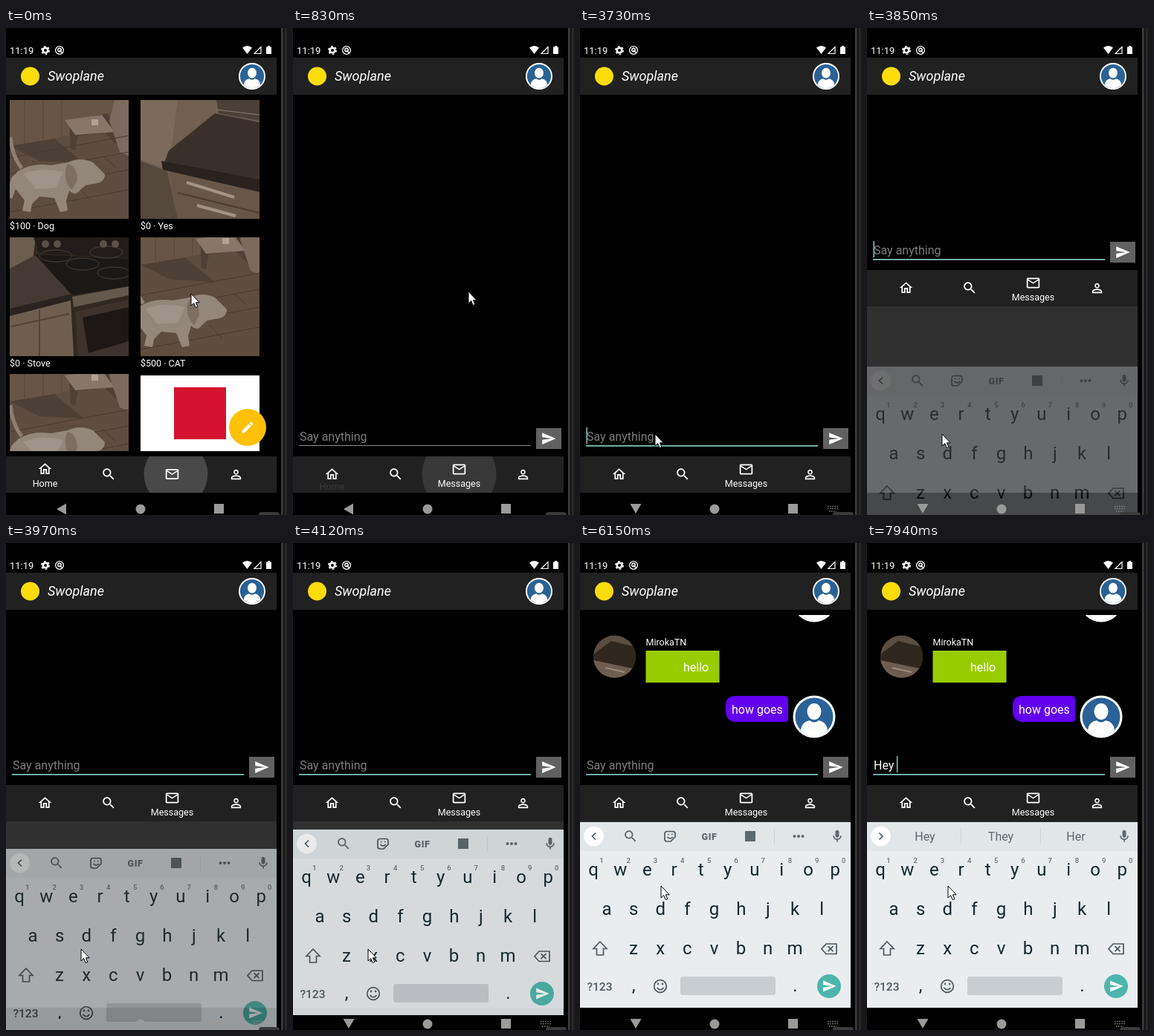
These frames come from a looping animation (378x656 px, 8000 ms). An HTML page:

```html
<!DOCTYPE html>
<html lang="en">
<head>
<meta charset="utf-8">
<title>Chat demo</title>
<style>
html, body { margin: 0; width: 100%; height: 100%; overflow: hidden; background: #000; }
svg { display: block; width: 100%; height: 100%; }
text { font-family: Roboto, sans-serif; font-size: 12.5px; fill: #fff; white-space: pre; }
.mid { text-anchor: middle; }
.body { font-size: 16px; }
.key { font-size: 24px; fill: #14282f; text-anchor: middle; }
.digit { font-size: 9.5px; font-weight: 500; fill: #66737a; text-anchor: middle; }
.hint { font-size: 16px; fill: #5d696f; text-anchor: middle; }
.line { fill: none; stroke: #4c5a60; stroke-width: 1.7; }
</style>
</head>
<body>
<svg id="stage" viewBox="0 0 378 656"></svg>
<script>
const PATHS = {
  home: 'M12 5.69l5 4.5V18h-2v-6H9v6H7v-7.81l5-4.5M12 3L2 12h3v8h6v-6h2v6h6v-8h3L12 3z',
  search: 'M15.5 14h-.79l-.28-.27C15.41 12.59 16 11.11 16 9.5 16 5.91 13.09 3 9.5 3S3 5.91 3 9.5 5.91 16 9.5 16c1.61 0 3.09-.59 4.23-1.57l.27.28v.79l5 4.99L20.49 19l-4.99-5zm-6 0C7.01 14 5 11.99 5 9.5S7.01 5 9.5 5 14 7.01 14 9.5 11.99 14 9.5 14z',
  mail: 'M22 6c0-1.1-.9-2-2-2H4c-1.1 0-2 .9-2 2v12c0 1.1.9 2 2 2h16c1.1 0 2-.9 2-2V6zm-2 0l-8 5-8-5h16zm0 12H4V8l8 5 8-5v10z',
  person: 'M12 5.9c1.16 0 2.1.94 2.1 2.1s-.94 2.1-2.1 2.1S9.9 9.16 9.9 8s.94-2.1 2.1-2.1m0 9c2.97 0 6.1 1.46 6.1 2.1v1.1H5.9V17c0-.64 3.13-2.1 6.1-2.1M12 4C9.79 4 8 5.79 8 8s1.79 4 4 4 4-1.79 4-4-1.79-4-4-4zm0 9c-2.67 0-8 1.34-8 4v3h16v-3c0-2.66-5.33-4-8-4z',
  send: 'M2 21L23 12 2 3v7l15 2-15 2z',
  edit: 'M3 17.25V21h3.75L17.81 9.94l-3.75-3.75L3 17.25zM20.71 7.04c.39-.39.39-1.02 0-1.41l-2.34-2.34c-.39-.39-1.02-.39-1.41 0l-1.83 1.83 3.75 3.75 1.83-1.83z',
  mic: 'M12 14c1.66 0 3-1.34 3-3V5c0-1.66-1.34-3-3-3S9 3.34 9 5v6c0 1.66 1.34 3 3 3zM17 11c0 2.76-2.24 5-5 5s-5-2.24-5-5H5c0 3.53 2.61 6.43 6 6.92V21h2v-3.08c3.39-.49 6-3.39 6-6.92h-2z'
};

// Markup helpers
const rect = (x, y, w, h, fill, more = '') => `<rect x="${x}" y="${y}" width="${w}" height="${h}" fill="${fill}" ${more}/>`;
const circle = (x, y, r, fill, more = '') => `<circle cx="${x}" cy="${y}" r="${r}" fill="${fill}" ${more}/>`;
const path = (d, fill, more = '') => `<path d="${d}" fill="${fill}" ${more}/>`;
const line = (d, more = '') => `<path d="${d}" class="line" ${more}/>`;
const text = (x, y, s, cls = '', more = '') => `<text x="${x}" y="${y}" class="${cls}" ${more}>${s}</text>`;
const group = (id, inner, more = '') => `<g id="${id}" ${more}>${inner}</g>`;
const icon = (name, x, y, size = 20, fill = '#fff', id = '') =>
  `<g id="${id}" transform="translate(${x} ${y})">` +
  path(PATHS[name], fill, `transform="scale(${size / 24}) translate(-12 -12)"`) + '</g>';

const avatar = (x, y, r) => `<g transform="translate(${x} ${y}) scale(${r / 28.5})">` +
  circle(0, 0, 28.5, '#fff') + circle(0, 0, 25.5, '#2a6296') +
  '<ellipse cy="-7" rx="9.5" ry="11" fill="#fff"/>' +
  path('M-18 18Q-17 7-6 5Q0 10 6 5Q17 7 18 18Q10 26 0 26T-18 18z', '#fff') + '</g>';

const photo = (x, y, inner) => `<svg x="${x}" y="${y}" width="160" height="160">${inner}</svg>`;

function dogPhoto(x, y, roomY, dx, dy) {
  const planks = [70, 92, 116, 143].map(v => `M0 ${v + 8}L160 ${v - 22}`).join('');
  return photo(x, y, rect(0, 0, 160, 160, '#5d4d40') +
    `<g transform="translate(0 ${roomY})">` +
    path('M0 0H160V30L60 52 0 62z', '#675647') +
    path('M20 0V58M45 0V54M70 0V50', 'none', 'stroke="#54463a"') +
    path('M0 62L60 52 100 85 40 82z', '#4d4036') +
    path('M80 28L132 18 150 52 146 62 128 44 92 48 88 68 82 66z', '#4c4037') +
    path('M74 27L124 20 141 43 88 47z', '#87776a') +
    path('M141 0H160V75L148 70 134 28z', '#7b6b5e') +
    path('M110 26h9v8h-9z', '#b0a294') + '</g>' +
    path(planks + 'M30 82l14 13M92 118l18 18M125 75l18 16', 'none', 'stroke="#46392f"') +
    `<g transform="translate(${dx} ${dy})">` +
    path('M1 50Q3 75 16 92', 'none', 'stroke="#8d7f71" stroke-width="5"') +
    path('M11 96Q30 84 55 88L78 84Q95 76 112 84L128 100Q128 112 112 113L102 115 94 122Q88 130 80 122L76 136 78 149 68 151 60 132 40 130 30 140 28 151 17 149 20 135 8 120 3 133-4 130 2 105z', '#93867a') +
    path('M78 86Q90 88 91 108L84 121Q73 112 75 93z', '#7c6e62') +
    path('M18 99Q45 90 72 97L62 118 35 120z', '#a0948a') + '</g>');
}

const counter = rect(0, 0, 160, 160, '#6f6051') +
  path('M0 0H50L42 62 28 90 0 80z', '#7a6b5c') +
  path('M102 0H160V28L105 18z', '#4a4038') + path('M102 13L160 20', 'none', 'stroke="#8a7b6b"') +
  path('M38 68L100 18 160 30V118L30 90z', '#3a302b') +
  path('M28 82L160 107V124L30 94z', '#29221f') +
  path('M38 96L160 125V160H50z', '#66574a') + path('M0 82L36 96 50 160H0z', '#55483d') +
  path('M50 125L160 152', 'none', 'stroke="#4a3d33" stroke-width="2"') +
  path('M62 111L126 131M76 142L128 156', 'none', 'stroke="#a09486" stroke-width="4"');

const stove = rect(0, 0, 160, 160, '#30291f') +
  path('M0 0H35L30 38 0 45z', '#6b5d50') + path('M32 0H160V28L40 22z', '#221d1a') +
  path('M35 23L160 29V66L82 78z', '#1c1816') +
  [[62, 25], [98, 36], [130, 20], [140, 48]].map(([x, y]) =>
    `<ellipse cx="${x}" cy="${y}" rx="22" ry="8" fill="none" stroke="#4a423c"/>`).join('') +
  [48, 64, 126, 142].map(x => circle(x, 9, 5, '#5c5148')).join('') +
  path('M0 42L34 24 84 78 0 98z', '#453a33') + path('M0 96L84 76V86L0 108z', '#2a231f') +
  path('M0 106L82 85 86 160H0z', '#6d5e50') +
  path('M2 120L80 103M40 98V160', 'none', 'stroke="#504337" stroke-width="2"') +
  path('M84 80L160 66V78L86 94z', '#65584d') + path('M88 100L160 84V160H92z', '#3d332c') +
  path('M98 108L160 94V140L106 156z', '#1d1815');

const home = group('home',
  dogPhoto(5, 97, 0, 0, 0) + photo(181, 97, counter) + photo(5, 282, stove) +
  dogPhoto(181, 282, -25, -12, -3) + dogPhoto(5, 466, -25, 0, -8) +
  rect(181, 468, 160, 110, '#fff') + rect(226, 484, 70, 70, '#d5122f') +
  text(5, 271, '$100 · Dog') + text(181, 271, '$0 · Yes') +
  text(5, 455.5, '$0 · Stove') + text(181, 455.5, '$500 · CAT') +
  rect(0, 570, 364, 10, '#000') + circle(325, 538, 25, '#ffc107') + icon('edit', 325, 538));

const chat = group('chat',
  `<svg y="97" width="364" height="180" viewBox="0 97 364 180">` +
  avatar(315, 78, 28.5) + avatar(315, 234, 28.5) +
  '<clipPath id="round"><circle cx="46.5" cy="153" r="28.5"/></clipPath><g clip-path="url(#round)">' +
  rect(18, 124, 57, 58, '#5a4d42') + path('M18 150L42 132 75 140V170L18 158z', '#30271f') +
  path('M18 158L75 170V182H18z', '#6d5e50') + path('M34 168L60 174', 'none', 'stroke="#9a8c7e" stroke-width="2"') + '</g>' +
  text(88.5, 138, 'MirokaTN') + rect(88.5, 145, 99, 43, '#99cc00') + text(139, 173, 'hello', 'body') +
  path('M208 206H275Q280 206 280 211V237Q280 241 276 241H208Q196 239 196 226V219Q196 207 208 206z', '#6200ee') +
  text(204, 230, 'how goes', 'body') + '</svg>');

const lower = group('lower',
  group('input',
    text(9, 555.5, 'Say anything', 'body', 'id="prompt" style="fill:#7d7d7d"') +
    text(9, 555.5, '', 'body', 'id="typed"') + rect(9, 558, 0, 1, '#fff', 'id="compose"') +
    rect(8, 562, 312, 1, '#8a8a8a', 'id="rule"') + rect(8.5, 538, 1.5, 22, '#80cbc4', 'id="caret"') +
    rect(327, 539, 34, 28, '#616161') + icon('send', 344, 553, 21)) +
  '<clipPath id="bar"><rect y="577" width="364" height="49"/></clipPath>' +
  rect(0, 577, 364, 49, '#212121') +
  `<g clip-path="url(#bar)">${circle(0, 601, 0, '#fff', 'id="ripple"')}</g>` +
  icon('home', 0, 0, 21, '#fff', 'homeIcon') + text(52.5, 617.5, 'Home', 'mid', 'id="homeLabel"') +
  icon('search', 138, 601, 21) + icon('mail', 0, 0, 21, '#fff', 'mailIcon') +
  text(223.5, 618, 'Messages', 'mid', 'id="mailLabel"') + icon('person', 309.5, 601.5, 20));

const row = (letters, x, y) => [...letters].map((c, i) => text(x + i * 36.15, y, c, 'key')).join('');
const gray = '#5d696f';
const tools = icon('search', 68, 395, 21, gray) +
  line('M117 388.5H125Q128 388.5 128 391.5V396L122 402H117Q114 402 114 399V391.5Q114 388.5 117 388.5zM117.5 396Q121 400 125 396M118 392.5h1.5M123 392.5h1.5') +
  text(174, 399.5, 'GIF', 'hint', 'style="font-size:12.5px;font-weight:900;letter-spacing:.6px"') +
  rect(222, 388, 14, 14, gray) + rect(261, 385, 1, 21, '#cdd2d5') +
  [288.5, 294, 299.5].map(x => circle(x, 395, 2, gray)).join('');
const hints = [78, 180, 281].map((x, i) => text(x, 401, '', 'hint', `id="hint${i}"`)).join('') +
  rect(126, 384, 1, 22, '#cdd2d5') + rect(233, 384, 1, 22, '#cdd2d5');

const keyboard = group('keyboard',
  rect(0, 376, 364, 250, '#e9edf0') + rect(0, 376, 364, 39, '#e1e6e9') +
  circle(18.5, 395, 13.3, '#fff') + line('M21 390.5L16.5 395 21 399.5', 'id="chevron"') +
  group('tools', tools) + group('hints', hints) + icon('mic', 346, 395, 20, gray) +
  row('qwertyuiop', 18, 448) + row('asdfghjkl', 36, 501) + row('zxcvbnm', 72, 554) +
  [...'1234567890'].map((c, i) => text(29 + i * 36.2, 431, c, 'digit')).join('') +
  line('M27 537L36 546.5H31.5V555H22.5V546.5H18z') +
  line('M331 540H345V553.5H331L325 546.7zM333.5 543.2L340.5 550.2M340.5 543.2L333.5 550.2') +
  text(26.5, 602.5, '?123', 'key', 'style="font-size:15.5px;font-weight:500;fill:#4c5a60"') +
  text(72, 604, ',', 'key') + text(289.5, 604, '.', 'key') +
  line('M103.5 599Q108 604.5 112.5 599') + circle(108, 597, 8.3, 'none', 'class="line"') +
  circle(105, 594, 1.4, gray) + circle(111, 594, 1.4, gray) +
  rect(135, 584, 128, 25, '#c8cdd1', 'rx="3"') +
  circle(335, 597, 16, '#4db6ac') + icon('send', 335.5, 597, 20));

const statusBar = text(5, 34.5, '11:19', '', 'style="font-size:13px"') +
  circle(53, 30, 3.3, 'none', 'stroke="#fff" stroke-width="2.6"') +
  circle(53, 30, 5.2, 'none', 'stroke="#fff" stroke-width="1.6" stroke-dasharray="2.7 2.75"') +
  circle(72, 30, 5.4, 'none', 'stroke="#fff" stroke-width="1.3"') +
  circle(72, 29.5, 2.3, 'none', 'stroke="#fff" stroke-width="1.4"') + path('M72 30L76 34', 'none', 'stroke="#fff" stroke-width="1.4"') +
  path('M318 26.5Q324.5 21.5 331 26.5L324.5 35z', '#fff') +
  path('M343 25.5V34.5H334z', 'none', 'stroke="#fff" stroke-width="1.2"') +
  path('M350 25.5h2V24h3v1.5h2V35h-7z', '#fff');

const header = rect(0, 40, 364, 50, '#212121') + circle(32.5, 65, 12.5, '#fddc0c') +
  text(56, 71, 'Swoplane', '', 'style="font-size:18px;font-style:italic"') + avatar(331, 65, 18);

const systemBar = path('', '#9a9a9a', 'id="back"') + circle(181, 648, 6.5, '#9a9a9a') + rect(280, 641, 13, 13, '#9a9a9a') +
  group('imeIcon', path('M333 644.5H347M333 647.5H347M335 651H345', 'none', 'stroke="#858585" stroke-width="1.4" stroke-dasharray="1.5 1.6"'));

const bezel = rect(370, 0, 8, 656, '#1b1b1b') + rect(370.5, 0, 1.5, 656, '#4b4b4b') + rect(376, 0, 1, 656, '#383838') +
  rect(340, 652, 28, 10, '#3a3a3a', 'rx="4"');

document.getElementById('stage').innerHTML = rect(0, 0, 378, 656, '#000') + statusBar + header + home + chat +
  rect(0, 375, 364, 251, '#303030', 'id="backdrop"') + lower + keyboard + systemBar + bezel +
  path('M0 0V16L3.7 12.6 6.2 18.5 8.8 17.4 6.4 11.8H11.2z', '#fff', 'id="cursor" stroke="#000" stroke-width="1"');

// Each track lists [start time, value...]; a value holds until the next start.
const POINTER = [[0, 249, 358], [120, 246, 358], [240, 243, 358], [540, 236, 355], [1370, 226, 380], [1490, 203, 428],
  [1610, 177, 482], [1760, 165, 505], [1880, 151, 520], [2000, 138, 532], [2120, 126, 540], [2240, 116, 545],
  [2380, 106, 546], [2530, 101, 547], [4680, 97, 545], [4800, 93, 518], [4950, 92, 511], [5090, 97, 492],
  [5220, 104, 475], [5340, 109, 462]];
const RIPPLE = [[0, 228.5, 43, .18], [120, 225, 48, .18], [240, 223.5, 50, .18], [830, 223.5, 50, .1], [970, 223.5, 50, 0]];
const RULE = [[0, '#8a8a8a', 1], [3200, '#85aca8', 1.3], [3320, '#80cbc4', 1.7]];
const CARET = [[0, 0], [3200, 1], [3970, 0], [4680, 1], [5090, 0], [5610, 1], [6150, 0], [7300, 1]];
const SLIDE = [[0, 250, 0], [3850, 80, .3], [3970, 36, .65], [4120, 10, .9], [4270, 0, 1]];
const TYPED = [[0, '', 0], [7300, 'H', 11.4], [7540, 'He', 19.9], [7690, 'Hey', 27.4], [7940, 'Hey ', 31.4]];
const HINTS = [[0, '', '', ''], [7420, 'H', 'Have', 'How'], [7540, 'He', 'The', 'Hey'], [7690, 'Hey', 'They', 'Her']];

const at = (track, t) => track.findLast(step => step[0] <= t).slice(1);
const el = id => document.getElementById(id);
const set = (id, attrs) => { for (const k in attrs) el(id).setAttribute(k, attrs[k]); };
const show = (id, on) => set(id, { display: on ? 'inline' : 'none' });
const move = (id, x, y) => set(id, { transform: `translate(${x} ${y})` });

function draw(t) {
  const messages = t >= 830, raised = t >= 3850, ime = t >= 3610, suggest = t >= 7420;
  show('home', !messages);
  show('input', messages);
  show('mailLabel', messages);
  show('chat', t >= 4680);
  show('backdrop', raised);
  show('imeIcon', ime);
  show('tools', !suggest);
  show('hints', suggest);
  move('homeIcon', 52.5, messages ? 601 : 594);
  move('mailIcon', 223.5, messages ? 594.5 : 601);
  set('homeLabel', { y: messages ? 622 : 617.5, opacity: messages ? (t < 970 ? .1 : 0) : 1 });
  move('lower', 0, raised ? -251 : 0);

  const [cx, r, alpha] = at(RIPPLE, t);
  set('ripple', { cx, r, opacity: alpha });
  const [fill, height] = at(RULE, t);
  set('rule', { fill, height });
  const [typed, width] = at(TYPED, t);
  el('typed').textContent = typed;
  show('prompt', !typed);
  set('compose', { width: t < 7940 ? width : 0 });
  set('caret', { x: 8.5 + width, opacity: at(CARET, t)[0] });

  const [drop, opacity] = at(SLIDE, t);
  move('keyboard', 0, drop);
  set('keyboard', { opacity });
  at(HINTS, t).forEach((word, i) => { el('hint' + i).textContent = word; });
  set('chevron', { d: suggest ? 'M16.5 390.5L21 395 16.5 399.5' : 'M21 390.5L16.5 395 21 399.5' });
  set('back', { d: ime ? 'M67.5 641H82.5L75 654z' : 'M81 640.5V655.5L68 648z' });
  move('cursor', ...at(POINTER, t));
}

function tick() {
  draw(performance.now() % 8000);
  requestAnimationFrame(tick);
}
tick();
</script>
</body>
</html>
```
